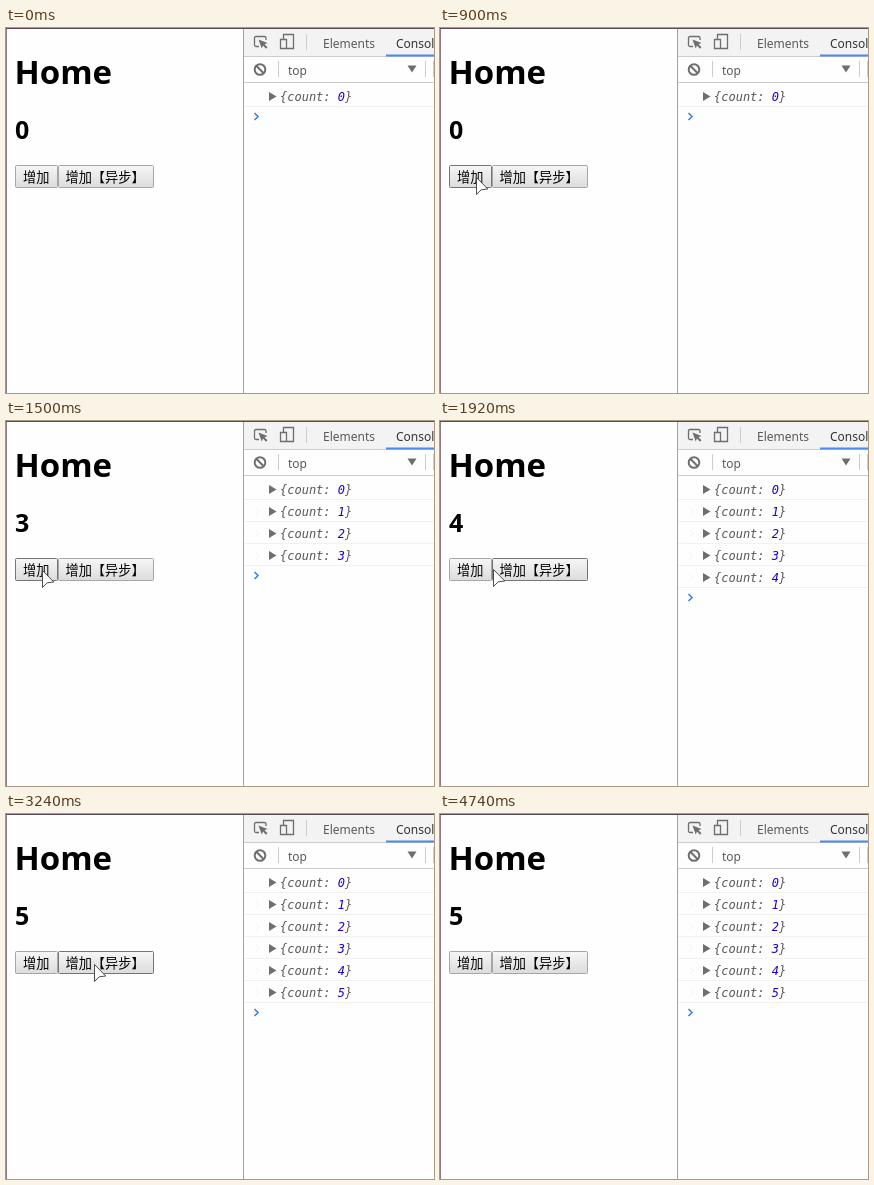
Animation, 428 px wide and 365 px high, one loop 5640 ms. Source, as an HTML page:

```html
<!DOCTYPE html>
<html lang="zh-CN">
<head>
<meta charset="utf-8">
<title>Counter</title>
<style>
  html, body { margin: 0; width: 100%; height: 100%; overflow: hidden; background: #fff; }
  svg { display: block; width: 428px; height: 365px; }
  text { white-space: pre; }
  .title { font: bold 33px "Noto Sans", "Open Sans", sans-serif; }
  .count { font: bold 25px "Noto Sans", "Open Sans", sans-serif; }
  .label { font: 13.2px "Noto Sans CJK SC", "Noto Sans CJK", sans-serif; }
  .ui { font: 12px "Noto Sans", "Open Sans", sans-serif; fill: #5a5a5a; }
  .ui.active { fill: #333; }
  .log { font: italic 12px "DejaVu Sans Mono", monospace; fill: #565656; }
  .num { fill: #1c00cf; }
  .button rect { fill: url(#face); stroke: #a6a6a6; }
  .button.hover rect { stroke: #747474; }
  .button.down rect { fill: url(#pressed); }
  .icon { fill: none; stroke: #6e6e6e; stroke-width: 1.3; }
  .icon.bold { stroke-width: 2; }
  .solid { fill: #6e6e6e; }
  .rule { stroke: #ccc; fill: none; }
  .prompt { fill: none; stroke: #3a83e6; stroke-width: 1.6; }
  .past { fill: none; stroke: #f2f2f2; }
  #cursor { fill: #fff; stroke: #3c3c3c; stroke-width: .9; }
</style>
</head>
<body>
<svg viewBox="0 0 428 365">
  <defs>
    <linearGradient id="face" x2="0" y2="1">
      <stop stop-color="#f6f6f6"/><stop offset="1" stop-color="#dcdcdc"/>
    </linearGradient>
    <linearGradient id="pressed" x2="0" y2="1">
      <stop stop-color="#d8d8d8"/><stop offset="1" stop-color="#eee"/>
    </linearGradient>
    <path id="chevron" d="M0 0l3.5 3.5l-3.5 3.5"/>
  </defs>

  <rect width="428" height="365" fill="#fefefe"/>

  <!-- page -->
  <path d="M.5 0V365" stroke="#8d7c86"/>
  <text class="title" x="8.5" y="56">Home</text>
  <text class="count" id="count" x="9" y="111">0</text>
  <g class="button" id="add">
    <rect x="9.5" y="137.5" width="42" height="22" rx="1"/>
    <text class="label" x="17" y="154">增加</text>
  </g>
  <g class="button" id="addLater">
    <rect x="52.5" y="137.5" width="95" height="22" rx="1"/>
    <text class="label" x="59.5" y="154">增加【异步】</text>
  </g>

  <!-- developer tools -->
  <rect x="238" width="190" height="28" fill="#f3f3f3"/>
  <path class="rule" d="M238 28.5H428M238 54.5H428M300.5 6V22M272.5 33V49M419.5 33V49M427.5 33V49"/>
  <path d="M237.5 0V365" stroke="#a3a3a3"/>
  <path d="M380 27.5H428" stroke="#4a8af4" stroke-width="2"/>
  <path class="icon" d="M253 18.5H250Q248.5 18.5 248.5 17V10Q248.5 8.5 250 8.5H258.5Q260 8.5 260 10V12"/>
  <path class="solid" d="M252.5 11.5L261.5 15L258.5 16.2L261.5 19.3L260 20.7L257 17.6L255.7 20.5Z"/>
  <path class="icon" d="M277.5 11V6.5H287.5V20.5H281M274.5 11.5H280.5V20.5H274.5Z"/>
  <path class="icon bold" d="M250.3 37.8L257.7 45.2"/>
  <circle class="icon bold" cx="254" cy="41.5" r="5.3"/>
  <text class="ui" x="317" y="20">Elements</text>
  <text class="ui active" x="390" y="20">Console</text>
  <text class="ui" x="282" y="47">top</text>
  <path class="solid" d="M401.5 37.5H410.5L406 44.5Z"/>
  <g id="rows"></g>
  <use class="prompt" id="prompt" href="#chevron" x="248.5"/>

  <path id="cursor" d="M.5 .5V17.5L5.2 12.8L11.8 12Z"/>
  <path d="M0 .5H428" stroke="#5a4a56"/>
</svg>
<script>
const LOOP = 5640, TICK = 60, ROW = 22;
const FIRST_CLICK = 1080, CLICK_GAP = 200, CLICKS = 4, DELAYED_ADD = 3240;

const el = id => document.getElementById(id);
const clamp = (v, lo, hi) => Math.min(hi, Math.max(lo, v));
const easeOut = u => 1 - (1 - u) ** 2;
const easeInOut = u => u * u * (3 - 2 * u);
const sweep = u => 1 - (1 - u ** 1.5) ** 3;

// Bézier curve through any number of control points
function bezier(points, u) {
  if (points.length === 1) return points[0];
  const mix = (a, b) => a + (b - a) * u;
  return bezier(points.slice(1).map(([x, y], i) =>
    [mix(points[i][0], x), mix(points[i][1], y)]), u);
}

const moves = [
  { from: 60, to: 840, ease: easeOut, points: [[428, 206], [120, -2], [36, 149]] },
  { from: 1740, to: 2220, ease: easeInOut, points: [[37, 148], [87, 149]] },
  { from: 2400, to: 2700, ease: easeInOut, points: [[87, 149], [88, 150]] },
  { from: 3780, to: 4740, ease: sweep, points: [[88, 150], [104, 319], [160, 262], [430, 185]] }
];

function pointerAt(t) {
  const { from, to, ease, points } = moves.findLast(m => t >= m.from) || moves[0];
  return bezier(points, ease(clamp((t - from) / (to - from), 0, 1))).map(Math.round);
}

function countAt(t) {
  const clicks = clamp(Math.floor((t - FIRST_CLICK) / CLICK_GAP) + 1, 0, CLICKS);
  return clicks + (t >= DELAYED_ADD);
}

const rowMarkup = n => {
  const y = 69 + n * ROW;
  return `<g>
    <path stroke="#f0f1f5" d="M238 ${y + 9.5}H428"/>
    ${n ? `<use class="past" href="#chevron" x="249.5" y="${y - 4}"/>` : ""}
    <path class="solid" d="M263 ${y - 5}V${y + 4}L270.5 ${y - .5}Z"/>
    <text class="log" x="274" y="${y + 4}">{count: <tspan class="num">${n}</tspan>}</text>
  </g>`;
};
el("rows").innerHTML = Array.from({ length: CLICKS + 2 }, (_, n) => rowMarkup(n)).join("");
const rows = [...el("rows").children];

function draw(t) {
  const count = countAt(t);
  el("count").textContent = count;
  rows.forEach((row, n) => row.setAttribute("visibility", n <= count ? "visible" : "hidden"));
  el("prompt").setAttribute("y", 85 + count * ROW);

  const [x, y] = pointerAt(t);
  el("cursor").setAttribute("transform", `translate(${x} ${y})`);

  const over = (left, right) => y >= 137 && y < 160 && x >= left && x < right;
  const overAdd = over(9, 52);
  el("add").classList.toggle("hover", overAdd);
  el("add").classList.toggle("down", overAdd && countAt(t + TICK) > count);
  el("addLater").classList.toggle("hover", over(52, 148));
}

const start = performance.now();
function frame() {
  const t = (performance.now() - start) % LOOP;
  draw(Math.floor(t / TICK) * TICK);
  requestAnimationFrame(frame);
}
frame();
</script>
</body>
</html>
```
